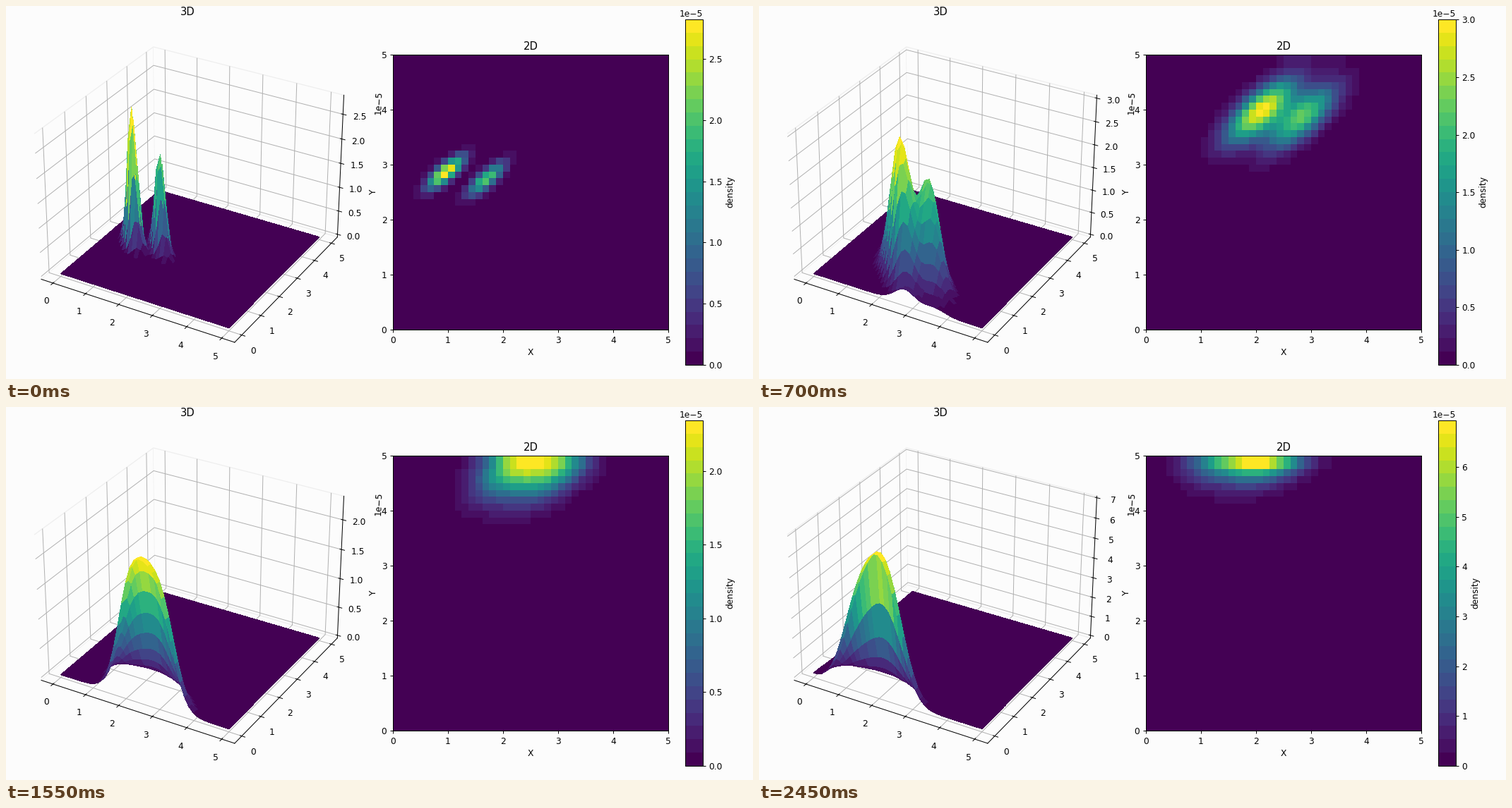
Animation, 1058 px wide and 529 px high, one loop 2.5 s. Source, as a matplotlib script:

```python
import numpy as np
import matplotlib.pyplot as plt
from matplotlib.animation import FuncAnimation

W, H = 1058, 529
FRAMES, INTERVAL = 50, 50
N, SIZE = 40, 5.0
BG = "#fcfcfc"
CMAP = plt.get_cmap("viridis", 26)

# Peak density (1e-5) at a few moments of the loop
PEAK_T = [0, 6, 14, 24, 31, 39, 49]
PEAK = [2.823, 3.005, 3.002, 1.91, 2.344, 10.166, 6.934]

# Border cells repeat their inner neighbours; row 0 is the top of the map
cells = (np.clip(np.arange(N), 1, N - 2) + 0.5) * SIZE / N
CX, CY = np.meshgrid(cells, SIZE - cells)
SX, SY = np.meshgrid(np.linspace(0, SIZE, N), np.linspace(0, SIZE, N))


def blob(x, y, sx, sy, shear):
    """Sheared Gaussian, periodic in x; above the wall it keeps its x."""
    dx = CX - x - shear * (CY - min(y, 4.6))
    dx = (dx + SIZE / 2) % SIZE - SIZE / 2
    return np.exp(-0.5 * ((dx / sx) ** 2 + ((CY - y) / sy) ** 2))


def density(t):
    # Both blobs drift left and up, widening as they go
    x = 0.96 - 0.267 * t - 0.00064 * t ** 2
    y = 2.86 + 0.09 * t - 0.0007 * t ** 2
    sx = 0.5 - 0.36 * np.exp(-t / 25)
    sy = 0.45 - 0.25 * np.exp(-t / 10)
    shear = 0.88 - 0.006 * t
    late = (t / FRAMES) ** 2
    u = blob(x, y, sx, sy, shear)
    u += (0.72 + 0.28 * late) * blob(x + 0.74, y - 0.12, sx, sy, shear)
    u *= 1 + 0.45 * late * np.exp(-CX ** 2)  # pile-up at the left edge
    return u / u.max() * np.interp(t, PEAK_T, PEAK) * 1e-5


def slot(left):
    return [left / W, 20 / H, 487.5 / W, 490 / H]


def padded(top, margin=0.0):
    lo, hi = -margin * top, (1 + margin) * top
    pad = (hi - lo) / 48
    return lo - pad, hi + pad


fig = plt.figure(figsize=(12, 6), dpi=W / 12, facecolor=BG)

ax3 = fig.add_axes(slot(13.2), projection="3d", facecolor="none")
ax3.set_title("3D")
for axis in (ax3.xaxis, ax3.yaxis, ax3.zaxis):
    axis.set_pane_color(BG)
    axis.pane.set_edgecolor("#eeeeee")

ax2 = fig.add_axes(slot(548))
ax2.set_title("2D")
ax2.set_xlabel("X")
ax2.set_ylabel("Y")
image = ax2.imshow(density(0), cmap=CMAP, extent=[0, SIZE, 0, SIZE],
                   interpolation="nearest")
fig.colorbar(image, ax=ax2, label="density")

surface = None


def update(i):
    global surface
    u = density(i)
    top = u.max()
    if surface is not None:
        surface.remove()
    surface = ax3.plot_surface(SX, SY, u, cmap=CMAP, linewidth=0,
                               antialiased=False)
    ax3.set_xlim(*padded(SIZE, 0.05))
    ax3.set_ylim(*padded(SIZE, 0.05))
    ax3.set_zlim(*padded(top))
    image.set_data(u)
    image.set_clim(0, top)
    return surface, image


anim = FuncAnimation(fig, update, frames=FRAMES, interval=INTERVAL,
                     init_func=lambda: update(0), blit=False, repeat=True,
                     repeat_delay=0)
plt.show()
```
